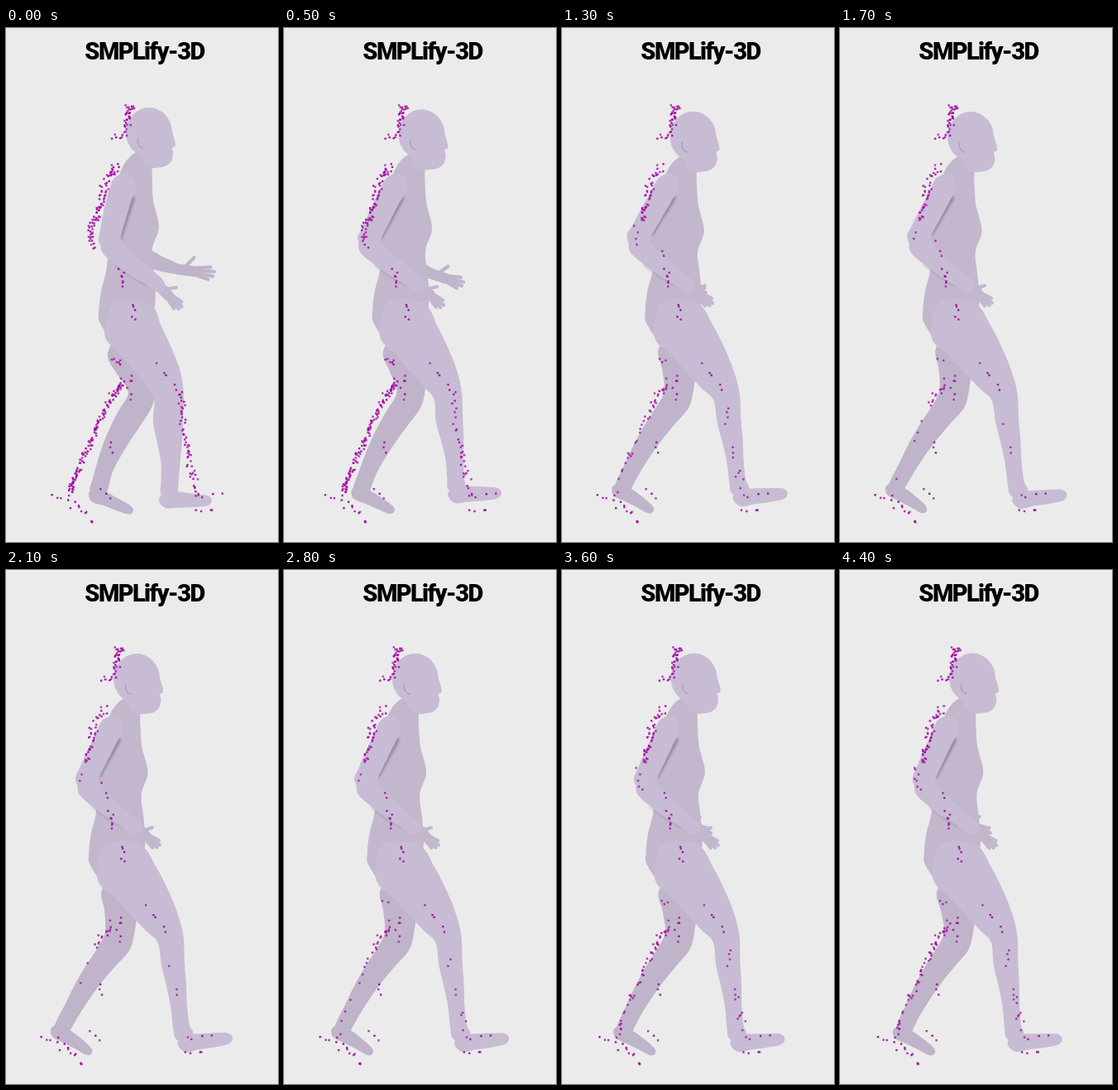
These frames come from a looping animation (329 px wide and 620 px high, 4500 ms). An HTML page with a canvas:

```html
<!DOCTYPE html>
<html lang="en">
<head>
<meta charset="utf-8">
<title>SMPLify-3D</title>
<style>
  html, body { margin: 0; width: 100%; height: 100%; overflow: hidden; background: #ebebeb; }
  body { position: relative; }
  canvas { position: absolute; inset: 0; width: 100%; height: 100%; }
  h1 {
    position: absolute; inset: 6px 0 auto; margin: 0; padding-left: 6px;
    text-align: center; white-space: nowrap; color: #000;
    font: 900 29px/44px Impact, Roboto, "Liberation Sans", sans-serif;
    letter-spacing: -1.6px;
  }
</style>
</head>
<body>
<canvas id="stage" width="329" height="620"></canvas>
<h1>SMPLify-3D</h1>
<script>
const ctx = document.getElementById('stage').getContext('2d');
const LOOP = 4500, STEP = 100;
const SKIN = '#c8bcd4', SHADE = '#c3b7cd', FAR = '#c0b4ca', DOT = '#a30aa4';

const pts = text => text.trim().split(/\s+/).map(p => p.split(',').map(Number));
const clamp = v => Math.min(1, Math.max(0, v));
const mix = (a, b, k) => a + (b - a) * k;
const smooth = k => k * k * (3 - 2 * k);

// Progress of the fit: eases to 1, then slips back a little
const settle = (t, rise, power, slip) =>
  1 - (1 - clamp(t / rise)) ** power - slip * smooth(clamp((t - 1900) / 2300));
const legFit = t => settle(t, 1900, 1.7, .22);
const bodyFit = t => settle(t, 1400, 1.3, .13);
const cloudFit = t => settle(t, 1350, 1.2, .26);
// Passing swing of elbow and front foot
const swing = t => Math.sin(Math.PI * Math.sqrt(clamp(t / 2000)));

// A limb is a chain of x,y,half-width, blended between two poses
const limbPose = (from, to) => {
  const a = pts(from), b = pts(to);
  return k => a.map((p, i) => p.map((v, c) => mix(v, b[i][c], k)));
};
const shift = (chain, move) => chain.map(([x, y, w], i) => {
  const [dx, dy] = move(i / (chain.length - 1), y);
  return [x + dx, y + dy, w];
});

const frontLeg = limbPose(
  `147,352,33 163,377,30 179,402,26 191,424,22 197,445,18 196,475,18 198,500,15
   199,525,11.5 198,550,10.5 197,562,10`,
  `136,352,33 157,377,31 174,402,27 188,424,22 199,445,16 202,475,14 206,500,12
   209,525,10 212,550,10 216,562,11`);
const frontFoot = limbPose('193,569,10 210,569,9.5 228,570,8 244,570,6',
  '216,571,10.5 232,569,9.5 252,567,8.5 269,565,6.5');
const backLeg = limbPose(
  `150,385,28 157,410,24 164,432,18 162,450,16 151,468,16 138,490,14.5 127,512,12.5
   119,532,10.5 114,550,10.5 111,560,10`,
  `138,385,22 139,410,20 138,432,18 134,450,17.5 120,469,15 105,489,13.5 92,509,12
   80,530,10.5 70,548,10 67,556,9`);
const backFoot = limbPose('107,563,9 122,569,8 137,576,7 150,582,5',
  '60,556,8 74,563,8.5 88,572,7 100,581,5');
const upperArm = limbPose('144,186,14 137,205,14.5 131,228,14 126,250,13 126,260,13',
  '129,186,13 120,205,13.5 110,225,13.5 101,244,13 96,257,13');
const foreArm = limbPose('125,260,13 141,277,12 159,291,11 176,303,9 186,312,8',
  '97,260,13 112,276,12 129,290,11 146,303,9 158,312,8');
const farArm = limbPose('165,274,9 186,284,9 208,291,6', '126,292,9 134,299,9 141,304,6');

const torso = pts(`164,158,13 158,175,19 154,205,24 155,222,26 157,239,28 151,264,26
  150,295,29 148,320,33 145,345,33 142,362,28`);
const face = pts('188,106 200,124 205,141 201,145 202,152 199,162 188,168 168,166 162,140');

// Seeded point cloud; shown share = base + gain * (1 - fit)
let seed = 7;
const rand = () => (seed = seed * 16807 % 2147483647) / 2147483647;
function trail(path, count, jitter, base = 1, gain = 0) {
  const line = pts(path);
  return Array.from({ length: count }, (_, i) => {
    const s = (i + rand()) / count * (line.length - 1), j = Math.floor(s);
    const [x, y] = [0, 1].map(c =>
      mix(line[j][c], line[j + 1][c], s - j) + (rand() + rand() - 1) * jitter);
    return { x, y, rank: rand(), base, gain };
  });
}
const cloud = [
  ...trail('151,95 147,102 149,110 144,119 140,132', 28, 5),
  ...trail('140,93 158,98', 5, 3),
  ...trail('126,131 142,131', 4, 3),
  ...trail('134,167 128,172 124,182 117,198', 30, 6, .65, .35),
  ...trail('117,198 114,215 110,228', 26, 4.5, .6, .4),
  ...trail('110,228 103,238 103,250 106,267', 28, 4.5, .15, .85),
  ...trail('128,240 131,260 141,288', 9, 5, .6, -.6),
  ...trail('138,293 145,312', 7, 4),
  ...trail('155,328 155,352', 5, 6),
  ...trail('130,400 141,403', 6, 4, 0, 1.5),
  ...trail('150,416 152,450', 6, 6),
  ...trail('181,401 209,441', 5, 2),
  ...trail('142,425 136,436 126,446 121,460', 36, 5, .4, 1),
  ...trail('121,460 110,478 104,497 95,515 88,535 80,548 78,560', 82, 4.5, .03, 1.8),
  ...trail('127,488 128,514', 3, 4),
  ...trail('211,440 212,460 215,485 219,505 222,522 227,542 234,566', 60, 5, .04, .85),
  ...trail('58,564 84,577 108,598', 15, 7),
  ...trail('108,553 134,570', 3, 2),
  ...trail('226,582 257,584', 4, 3),
  ...trail('232,566 266,561', 3, 2)
];

function fillCurve(p, fill) {
  const n = p.length;
  ctx.beginPath();
  ctx.moveTo(p[0][0], p[0][1]);
  for (let i = 0; i < n; i++) {
    const [a, b, c, d] = [n - 1, 0, 1, 2].map(o => p[(i + o) % n]);
    ctx.bezierCurveTo(b[0] + (c[0] - a[0]) / 6, b[1] + (c[1] - a[1]) / 6,
      c[0] - (d[0] - b[0]) / 6, c[1] - (d[1] - b[1]) / 6, c[0], c[1]);
  }
  ctx.fillStyle = fill;
  ctx.fill();
}

function limb(chain, fill) {
  const last = chain.length - 1, left = [], right = [];
  let head, tail;
  chain.forEach(([x, y, w], i) => {
    const a = chain[Math.max(0, i - 1)], b = chain[Math.min(last, i + 1)];
    const angle = Math.atan2(b[1] - a[1], b[0] - a[0]);
    const dx = Math.cos(angle) * w, dy = Math.sin(angle) * w;
    left.push([x + dy, y - dx]);
    right.unshift([x - dy, y + dx]);
    if (i === 0) head = [x - dx * .8, y - dy * .8];
    if (i === last) tail = [x + dx * .8, y + dy * .8];
  });
  fillCurve([head, ...left, tail, ...right], fill);
}

function line(points, color, width) {
  ctx.beginPath();
  points.forEach(([x, y]) => ctx.lineTo(x, y));
  ctx.strokeStyle = color;
  ctx.lineWidth = width;
  ctx.stroke();
}

function hand([x, y], angle, reach, color) {
  const out = (a, r) => [x + Math.cos(a) * r, y + Math.sin(a) * r];
  line([[x, y], out(angle, reach * .4)], color, 13);
  [.9, 1, .98, .88].forEach((length, i) => {
    const a = angle + (i - 1.5) * .13;
    line([out(a, reach * .4), out(a, reach * length - 2)], color, 4.2);
  });
  line([out(angle - .3, 7), out(angle - .75, reach * .52)], color, 4.2);
}

function drawBody(fit) {
  const place = ([x, y, w]) => [
    x - mix(15, 12, clamp((y - 130) / 210)) * fit,
    y + 5 * fit * (1 - clamp((y - 230) / 110)), w];
  limb(torso.map(place), SHADE);
  const [cx, cy] = place([173, 126]);
  ctx.beginPath();
  ctx.ellipse(cx, cy, 28, 30, 0, 0, 2 * Math.PI);
  ctx.fillStyle = SKIN;
  ctx.fill();
  fillCurve(face.map(place), SKIN);
  line(pts('160,133 159,138 162,143 166,145').map(place), 'rgba(125,108,142,.4)', 1.2);
}

function drawArm(upper, lower) {
  const armpit = [upper[1][0] + 17, upper[1][1]], elbow = [upper[3][0] + 12, upper[3][1] + 4];
  fillCurve([upper[1], armpit, lower[2], lower[1], upper[4]], SHADE);
  ctx.save();
  ctx.filter = 'blur(1.5px)';
  line([elbow, armpit], 'rgba(95,85,108,.5)', 4);
  line(lower.slice(1, 4).map(([x, y, w]) => [x - w * .6, y + w * .8]), 'rgba(105,92,118,.35)', 2);
  ctx.restore();
  limb(upper, SKIN);
  limb(lower, SKIN);
}

function drawCloud(t) {
  const dx = -13 * cloudFit(t), open = 1 - legFit(t);
  ctx.fillStyle = DOT;
  for (const d of cloud) {
    if (d.rank >= d.base + d.gain * open) continue;
    ctx.globalAlpha = .75 + d.rank * .25;
    ctx.fillRect(d.x + dx - 1.2, d.y - 1.2, 2.4, 2.4);
  }
  ctx.globalAlpha = 1;
}

function draw(t) {
  const legs = legFit(t), body = bodyFit(t), s = swing(t);
  const lift = (_, y) => [4 * s * clamp((y - 430) / 120), -7 * s * clamp((y - 430) / 120)];
  ctx.fillStyle = '#ebebeb';
  ctx.fillRect(0, 0, 329, 620);
  ctx.lineCap = ctx.lineJoin = 'round';

  const far = farArm(body);
  limb(far, FAR);
  hand(far[2], mix(.13, .55, body), mix(46, 36, body), FAR);
  limb(backLeg(legs), FAR);
  limb(backFoot(legs), FAR);
  drawBody(body);
  limb(shift(frontLeg(legs), lift), SKIN);
  limb(shift(frontFoot(legs), lift), SKIN);

  const upper = shift(upperArm(body), k => [-12 * s * k, 0]);
  const lower = shift(foreArm(body), k => [mix(-12, -8, k) * s, 0]);
  hand(lower[4], mix(.8, .68, body), mix(38, 36, body), SHADE);
  drawArm(upper, lower);
  drawCloud(t);
}

const start = performance.now();
function tick() {
  const t = (performance.now() - start) % LOOP;
  draw(Math.floor(t / STEP) * STEP);
  requestAnimationFrame(tick);
}
tick();
</script>
</body>
</html>
```
